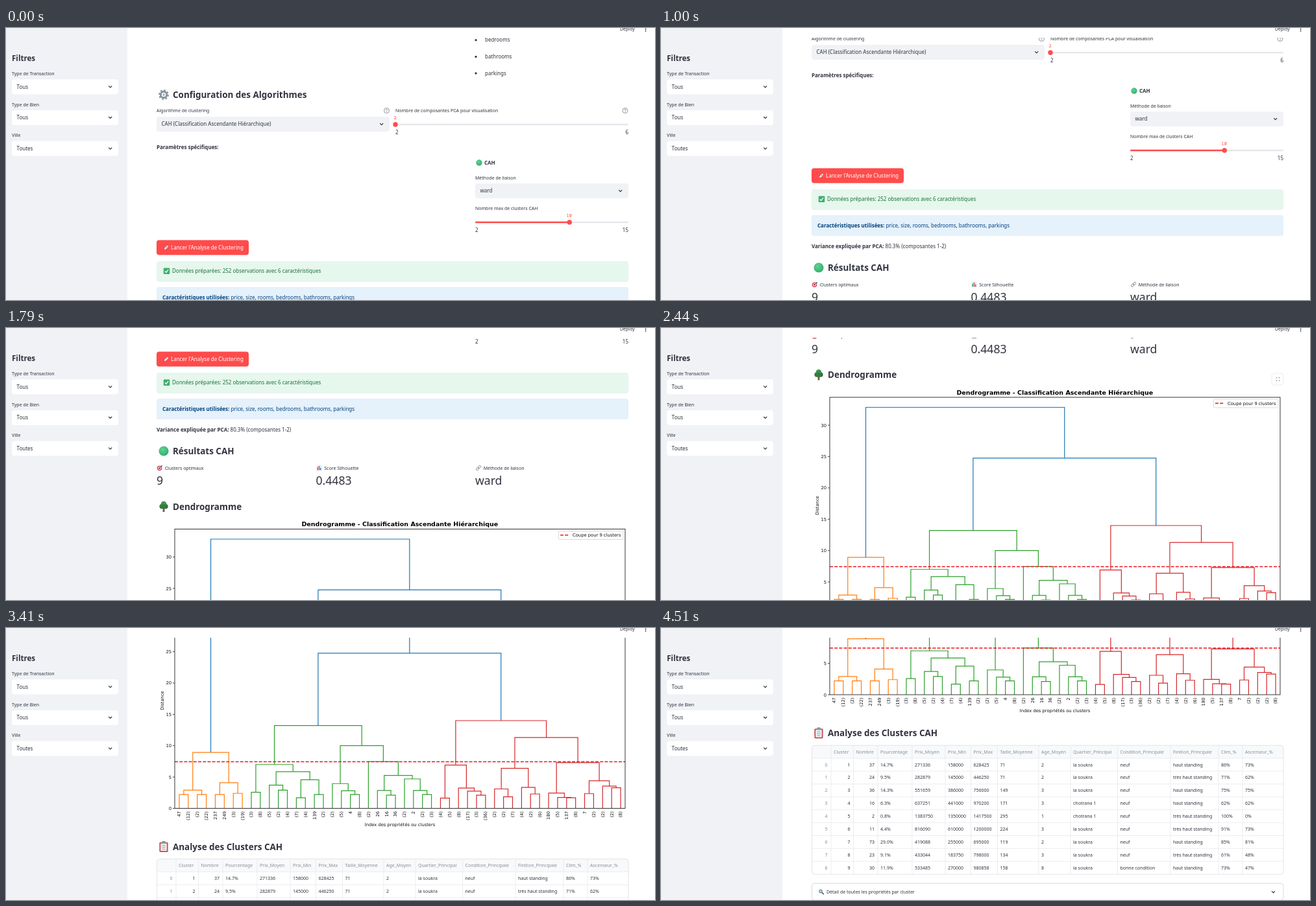
Animation, 1000 px wide and 420 px high, one loop 4530 ms. Source, as an HTML page:

```html
<!DOCTYPE html>
<html lang="fr">
<head>
<meta charset="utf-8">
<title>Clustering</title>
<style>
  html, body { margin: 0; width: 100%; height: 100%; overflow: hidden; background: #fff; }
  svg { display: block; width: 100vw; height: 100vh; }
  text { font: 8px "Noto Sans", "Open Sans", sans-serif; fill: #31333f; white-space: pre; }
  .small { font-size: 7px; }
  .bold { font-weight: 600; }
  .h2 { font-size: 13.45px; font-weight: 600; }
  .h3 { font-size: 11.6px; font-weight: 600; }
  .value { font-size: 17.6px; }
  .mono { font: 7px "Noto Sans Mono", monospace; fill: #ff4b4b; }
  .plot { font: 6.77px "DejaVu Sans", sans-serif; fill: #111; }
  .title { font: bold 9.47px "DejaVu Sans", sans-serif; fill: #000; }
  .head { font-size: 7px; fill: #8b8d97; }
  .white { fill: #fff; }
  .ok { fill: #177233; }
  .info { fill: #004280; }
</style>
</head>
<body>
<svg viewBox="0 0 1000 420" preserveAspectRatio="none">
  <defs>
    <radialGradient id="ball" cx=".4" cy=".35" r=".7">
      <stop offset="0" stop-color="#5fd592"/><stop offset="1" stop-color="#35ab6c"/>
    </radialGradient>
  </defs>
  <g id="page"></g>
  <g id="chrome"></g>
</svg>
<script>
const INK = '#31333f', RED = '#ff4b4b', FIELD = '#f0f2f6';
const ORANGE = '#ff7f0e', GREEN = '#2ca02c', CRIMSON = '#d62728', BLUE = '#1f77b4';

const text = (x, y, s, cls = '', anchor = 'start') =>
  `<text x="${x}" y="${y}" class="${cls}" text-anchor="${anchor}">${s}</text>`;
const turned = (x, y, s, anchor) =>
  `<text transform="translate(${x} ${y}) rotate(-90)" class="plot" text-anchor="${anchor}">${s}</text>`;
const rect = (x, y, w, h, fill, r = 0, extra = '') =>
  `<rect x="${x}" y="${y}" width="${w}" height="${h}" rx="${r}" fill="${fill}" ${extra}/>`;
const path = (d, stroke, width = 1, extra = '') =>
  `<path d="${d}" fill="none" stroke="${stroke}" stroke-width="${width}" ${extra}/>`;
const disc = (x, y, r, fill) => `<circle cx="${x}" cy="${y}" r="${r}" fill="${fill}"/>`;
const chevron = (x, y) => path(`M${x - 2.5} ${y - 1.2}l2.5 2.5l2.5 -2.5`, INK, 1.2);

const select = (x, y, w, label, fill = FIELD) =>
  rect(x, y, w, 23, fill, 4) + text(x + 7.5, y + 14.4, label) + chevron(x + w - 12.3, y + 11.3);

const slider = (x, y, min, max, value) => {
  const end = 959, knob = x + (end - x) * (value - min) / (max - min);
  return rect(x, y - 1.2, end - x, 2.4, '#e6e7ec', 1.2) + rect(x, y - 1.2, knob - x, 2.4, RED, 1.2) +
    disc(knob, y, 3.7, RED) + text(knob - .5, y - 7.8, value, 'mono', 'middle') +
    text(x, y + 15, min) + text(end, y + 15, max, '', 'end');
};

const help = (x, y) => `<circle cx="${x}" cy="${y}" r="4" fill="none" stroke="#777983" stroke-width=".8"/>` +
  path(`M${x - 1.2} ${y - .8}q0 -1.3 1.2 -1.3t1.2 1.2q0 .7 -1.2 1.4v.5m0 .7v.7`, '#777983', .8);

// Pictograms, each drawn around its centre in an 18 unit box
const icons = {
  gear: `<circle r="5" fill="none" stroke="#85929c" stroke-width="3"/>` +
    `<circle r="7.2" fill="none" stroke="#85929c" stroke-width="2.4" stroke-dasharray="2.83 2.83"/>` + disc(0, 0, 1.8, '#9aa6ae'),
  ball: disc(0, 0, 8, 'url(#ball)'),
  target: disc(-1, 1, 7.5, '#d8384a') + disc(-1, 1, 5, '#f6eef0') + disc(-1, 1, 3, '#d8384a') +
    path('M-1 1L7 -7M5 -8v3h3', '#3d6f9e', 1.8),
  bars: rect(-8, -8, 16, 16, '#e4eaf0', 1) + rect(-6, -2, 3, 9, '#43a36b') +
    rect(-1.5, -6, 3, 13, '#d64a55') + rect(3, 0, 3, 7, '#3f7fc0'),
  link: `<g transform="rotate(-45)" fill="none" stroke="#98a3ad" stroke-width="2">` +
    `<rect x="-9" y="-3" width="10" height="6" rx="3"/><rect x="-1" y="-3" width="10" height="6" rx="3"/></g>`,
  tree: rect(-1.5, 2, 3, 7, '#805440') + disc(-3, 0, 4, '#357d43') + disc(3, 0, 4, '#2d703b') +
    disc(0, -4, 4.5, '#43934f') + disc(0, 0, 4, '#357d43'),
  clipboard: rect(-7, -7, 14, 16, '#c0534f', 1.5) + rect(-5, -5, 10, 12, '#f2f4f7') +
    rect(-3, -9, 6, 4, '#8a98a5', 1) + path('M-3 -2h6M-3 1h6M-3 4h6', '#8499ad', 1),
  rocket: `<g transform="rotate(45)">` + path('M-4 5l4 -4l4 4', '#c43445', 3) +
    `<ellipse rx="3.2" ry="8" fill="#e9eef3"/>` + disc(0, -2, 1.6, '#4a89b8') + '</g>',
  check: rect(-9, -9, 18, 18, '#3fae6d', 2) + path('M-5 0l3.5 4l6.5 -8', '#fff', 2.4),
  lens: path('M2 2l6 6', '#39424e', 3) + `<circle cx="-2" cy="-2" r="5" fill="#b4d8f2" stroke="#47627c" stroke-width="2"/>`
};
const icon = (name, x, y, size) => `<g transform="translate(${x} ${y}) scale(${size / 18})">${icons[name]}</g>`;
const heading = (name, y, s) => icon(name, 243, y, 17) + text(257, y + 5, s, 'h2');

function settings() {
  return ['bedrooms', 'bathrooms', 'parkings'].map((s, i) =>
      disc(724, 18.7 + 25.6 * i, 1.6, INK) + text(738, 21.4 + 25.6 * i, s)).join('') +
    heading('gear', 103, 'Configuration des Algorithmes') +
    text(232, 130, 'Algorithme de clustering', 'small') + help(586.5, 127.5) +
    select(232, 137, 359, 'CAH (Classification Ascendante Hiérarchique)') +
    text(600, 130, 'Nombre de composantes PCA pour visualisation', 'small') + help(954, 127.5) +
    slider(600, 149, 2, 6, 2) +
    text(232, 187, 'Paramètres spécifiques:', 'bold') +
    icon('ball', 729, 208, 10.5) + text(737, 211, 'CAH', 'bold') +
    text(723, 233.5, 'Méthode de liaison', 'small') + select(723, 240, 236, 'ward') +
    text(723, 281, 'Nombre max de clusters CAH', 'small') + slider(723, 300, 2, 15, 10);
}

function results() {
  const metrics = [[232, 'target', 'Clusters optimaux', '9'], [477.5, 'bars', 'Score Silhouette', '0.4483'],
    [723, 'link', 'Méthode de liaison', 'ward']];
  return rect(232, 327.5, 142, 23, RED, 4) + icon('rocket', 247, 339, 8.5) +
    text(254, 342, "Lancer l'Analyse de Clustering", 'white') +
    rect(232, 360, 727, 32, '#e6f7ed', 4) + icon('check', 247.5, 375.3, 9.5) +
    text(256, 378.2, 'Données préparées: 252 observations avec 6 caractéristiques', 'ok') +
    rect(232, 400, 727, 32, '#e5f1fb', 4) +
    text(241, 418.8, '<tspan class="bold">Caractéristiques utilisées:</tspan> price, size, rooms, bedrooms, bathrooms, parkings', 'info') +
    text(232, 451, '<tspan class="bold">Variance expliquée par PCA:</tspan> 80.3% (composantes 1-2)') +
    heading('ball', 481, 'Résultats CAH') +
    metrics.map(([x, pic, label, value]) => icon(pic, x + 5, 507, 9) +
      text(x + 12.7, 509.5, label, 'small') + text(x, 533.3, value, 'value')).join('');
}

// A branch is [height, left, right]; 0 is a leaf
const pair = h => [h, 0, 0];
const orangeTree = [8.93, [2.9, pair(2.2), pair(2.2)], [4.1, pair(2.2), pair(2.4)]];
const greenTree = [13.2,
  [7, pair(2.57), [5.85, [3.7, 0, pair(2.9)], [4.55, pair(1.7), pair(2.2)]]],
  [10, [3.95, 0, [2.8, 0, pair(2.2)]],
    [7.45, 0, [5.25, [2.85, 0, pair(2.1)], [4.7, 0, [2.85, 0, pair(2.2)]]]]]];
const redTree = [14,
  [6.9, pair(1.65), [3.25, 0, [2.75, 0, pair(2.1)]]],
  [11.3, [6.4, [3.1, 0, pair(1.85)], [3.35, 0, pair(2.3)]],
    [7.3, [2.45, 0, [1.75, 0, pair(1.7)]], [4.4, pair(2.35), [3.55, 0, pair(3.3)]]]]];
const leaves = ('47 (12) (2) (22) 237 249 (3) (19) (3) (8) (5) (2) (4) (7) (4) 139 (2) (2) (5) 4 (8) (2) 26 16 36 ' +
  '(2) 2 (2) (3) (4) (5) (8) (17) (3) (36) (2) (2) (7) (4) (2) (6) 180 (5) 137 (8) 7 (2) (2) (2) (8)').split(' ');

function chart() {
  const left = 260, right = 954, top = 601.5, bottom = 935, step = (right - left) / leaves.length;
  const level = v => bottom - 9.68 * v;
  const leafX = i => left + step * (i + .5);
  let out = '', next = 0;
  const join = (a, b, y, color) => {
    out += path(`M${a.x} ${a.y}V${y}H${b.x}V${b.y}`, color, 1.2);
    return { x: (a.x + b.x) / 2, y };
  };
  const grow = (node, color) => {
    if (!node) return { x: leafX(next++), y: bottom };
    const a = grow(node[1], color), b = grow(node[2], color);
    return join(a, b, level(node[0]), color);
  };
  const a = grow(orangeTree, ORANGE), b = grow(greenTree, GREEN), c = grow(redTree, CRIMSON);
  join(a, join(b, c, level(24.75), BLUE), level(32.85), BLUE);

  const dash = 'stroke-dasharray="5 2.2"', cut = '#ea1420';
  out += path(`M${left} ${level(7.45)}H${right}`, cut, 1.5, dash);
  out += rect(left, top, right - left, bottom - top, 'none', 0, 'stroke="#222" stroke-width=".9"');
  for (let v = 0; v <= 30; v += 5)
    out += path(`M${left - 3} ${level(v)}h3`, '#222', .8) + text(255, level(v) + 2.5, v, 'plot', 'end');
  leaves.forEach((s, i) => out += turned(leafX(i) + 2.4, 939.5, s, 'end'));
  return heading('tree', 566.5, 'Dendrogramme') +
    text(606.8, 597.3, 'Dendrogramme - Classification Ascendante Hiérarchique', 'title', 'middle') + out +
    rect(851.5, 604.5, 99.5, 13, '#fff', 1.5, 'stroke="#ccc" stroke-width=".7"') +
    path('M854 610.7h13.5', cut, 1.5, dash) + text(873, 613, 'Coupe pour 9 clusters', 'plot') +
    turned(242.6, 768.5, 'Distance', 'middle') +
    text(607, 962.3, 'Index des propriétés ou clusters', 'plot', 'middle') +
    '<g id="expand">' + rect(941, 564.5, 18, 18, '#fff', 4, 'stroke="#ececf0" stroke-width="1"') +
    path('M948 572.5v-1.5h1.5m2 0h1.5v1.5m0 2v1.5h-1.5m-2 0h-1.5v-1.5', '#8b8d97', .8) + '</g>';
}

const columns = [262, 296.5, 334, 387, 438, 477.5, 518.5, 582, 631, 703.5, 785, 859, 896];
const header = 'Cluster Nombre Pourcentage Prix_Moyen Prix_Min Prix_Max Taille_Moyenne Age_Moyen Quartier_Principal Condition_Principale Finition_Principale Clim_% Ascenseur_%'.split(' ');
const rows = `1|37|14.7%|271336|158000|628425|71|2|la soukra|neuf|haut standing|86%|73%
2|24|9.5%|282879|145000|446250|71|2|la soukra|neuf|très haut standing|71%|62%
3|36|14.3%|551659|386000|756000|149|3|la soukra|neuf|haut standing|75%|75%
4|16|6.3%|637251|441000|970200|171|3|chotrana 1|neuf|haut standing|62%|62%
5|2|0.8%|1383750|1350000|1417500|295|1|chotrana 1|neuf|très haut standing|100%|0%
6|11|4.4%|816090|610000|1200000|224|3|la soukra|neuf|très haut standing|91%|73%
7|73|29.0%|419088|255000|695000|119|2|la soukra|neuf|haut standing|85%|81%
8|23|9.1%|433044|183750|798000|134|3|la soukra|neuf|très haut standing|61%|48%
9|30|11.9%|533485|270000|980858|158|8|la soukra|bonne condition|haut standing|73%|47%`.split('\n').map(r => r.split('|'));

function table() {
  const top = 1013.2, rowH = 19.9, height = rowH * 10, line = '#e8e9ed';
  const base = i => top + rowH * (i + .5) + 2.5;
  let out = rect(232.5, top, 726.5, rowH, '#f8f9fb', 3);
  out += columns.map(x => path(`M${x} ${top}v${height}`, line, .8)).join('');
  rows.forEach((row, i) => {
    out += path(`M232.5 ${top + rowH * (i + 1)}H959`, line, .8) + text(256.5, base(i + 1), i, 'head', 'end');
    row.forEach((cell, j) => out += j < 2
      ? text(columns[j + 1] - 5, base(i + 1), cell, 'small', 'end')
      : text(columns[j] + 4, base(i + 1), cell, 'small'));
  });
  header.forEach((s, j) => out += text(columns[j] + 4, base(0), s, 'head'));
  return heading('clipboard', 994, 'Analyse des Clusters CAH') + out +
    rect(232.5, top, 726.5, height, 'none', 4, 'stroke="#e0e1e6" stroke-width=".9"') +
    rect(232.5, 1226.3, 726.5, 26, '#fff', 4, 'stroke="#d5d6dc" stroke-width=".9"') +
    icon('lens', 247, 1239.5, 8.5) + text(255, 1242, 'Détail de toutes les propriétés par cluster', 'small') +
    chevron(943.5, 1239.5);
}

function chrome() {
  const filters = [['Type de Transaction', 'Tous'], ['Type de Bien', 'Tous'], ['Ville', 'Toutes']];
  return rect(186, 0, 814, 15, '#fff') + rect(0, 0, 187, 420, FIELD) +
    text(9, 50.5, 'Filtres', 'h3') +
    filters.map(([label, value], i) => text(9, 73 + 47.7 * i, label, 'small') +
      select(9, 79.2 + 47.7 * i, 164, value, '#fff')).join('') +
    text(946, 4.3, 'Deploy', 'small') + [-1, 1.8, 4.6].map(y => disc(985.6, y, .95, INK)).join('');
}

const page = document.getElementById('page');
page.innerHTML = settings() + results() + chart() + table();
document.getElementById('chrome').innerHTML = chrome();
const expand = document.getElementById('expand');

// The screen refreshes only at these moments (ms)
const LOOP = 4530;
const refresh = [0, 100, 200, 300, 410, 510, 620, 710, 800, 900, 1000, 1120, 1190, 1290, 1440, 1530, 1610, 1700,
  1790, 1910, 2000, 2220, 2440, 2590, 2720, 2910, 2940, 3100, 3180, 3260, 3340, 3410, 3490, 3630, 3820, 3910,
  4000, 4100, 4200, 4300, 4390, 4510];
const stops = [[0, 0], [1000, 111], [1790, 291], [2440, 494.5], [3410, 656.5], [4100, 630.5], [4510, 832]];

function scrollAt(t) {
  const i = Math.max(1, stops.findIndex(s => s[0] >= t));
  const [t0, y0] = stops[i - 1], [t1, y1] = stops[i];
  return y0 + (y1 - y0) * (t - t0) / (t1 - t0);
}

function draw(ms) {
  const now = ms % LOOP;
  const t = refresh.filter(r => r <= now).pop();
  page.setAttribute('transform', `translate(0 ${-scrollAt(t)})`);
  expand.setAttribute('visibility', t >= 2220 ? 'visible' : 'hidden');
}

const start = performance.now();
function tick() {
  draw(Math.max(0, performance.now() - start));
  requestAnimationFrame(tick);
}
tick();
</script>
</body>
</html>
```
